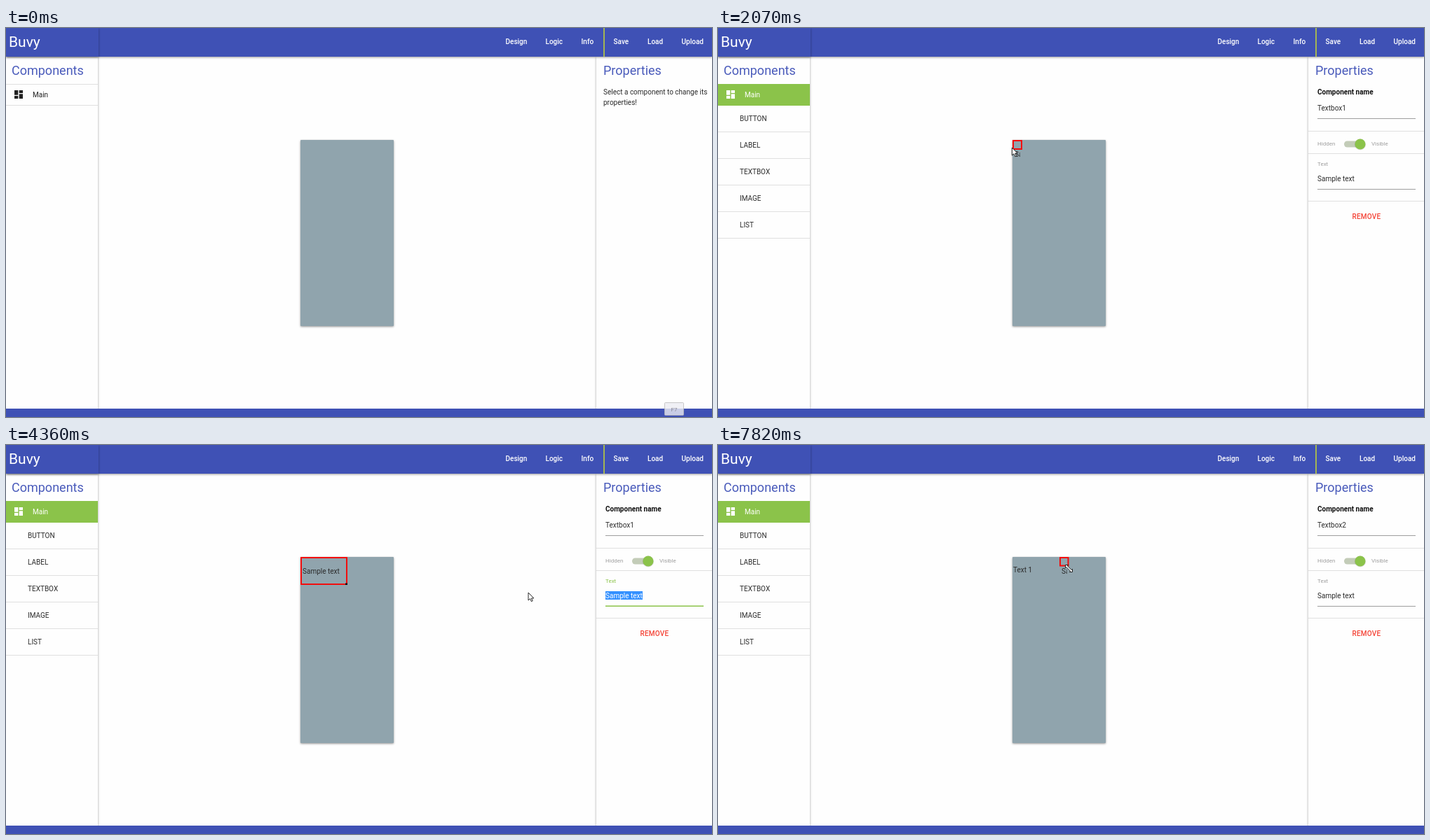
Write an HTML page that moves like this. It is 1007 by 556 pixels and loops after 8 s.

```html
<!DOCTYPE html>
<html lang="en">
<head>
<meta charset="utf-8">
<title>App designer</title>
<style>
html, body { margin: 0; width: 100%; height: 100%; overflow: hidden; background: #fefefe; }
#stage { position: absolute; left: 0; top: 0; width: 1007px; height: 556px; overflow: hidden; }
#stage div { position: absolute; }
#left { left: 0; top: 41px; width: 131px; height: 503px; }
#right { left: 842px; top: 41px; width: 165px; height: 503px; }
#left, #right { background: #fefefe; box-shadow: 0 1px 3px rgba(0,0,0,.38); }
#bar { left: 0; top: 0; width: 1007px; height: 41px; }
#brand { left: 0; top: 0; width: 132px; height: 41px; }
#foot { left: 0; top: 544px; width: 1007px; height: 12px; }
#bar, #brand, #foot { background: #3f51b5; }
#bar, #brand { box-shadow: 0 1px 3px rgba(0,0,0,.4); }
#phone { left: 420px; top: 160px; width: 133px; height: 266px; border-radius: 1px;
  background: #90a4ad; box-shadow: 0 1px 3px rgba(0,0,0,.42); }
svg { position: absolute; left: 0; top: 0; }
text { font: 10px Roboto, sans-serif; fill: #2b2b2b; white-space: pre; }
.title { font-size: 18px; fill: #4a5bbb; }
.nav { font-weight: 500; fill: #fff; }
.small { font-size: 8px; fill: #9e9e9e; }
.rule { fill: #e0e0e0; }
.frame { fill: none; stroke: #f20d0d; stroke-width: 2; }
.glyph { fill: #fff; stroke: #111; stroke-width: .9; stroke-linejoin: round; }
</style>
</head>
<body>
<div id="stage">
  <div id="left"></div><div id="right"></div><div id="phone"></div>
  <div id="bar"></div><div id="brand"></div><div id="foot"></div>
  <svg width="1007" height="556">
    <defs>
      <clipPath id="menuClip"><rect id="menuArea" y="110" width="131"/></clipPath>
      <clipPath id="selClip"><rect id="selArea" y="209" height="12"/></clipPath>
      <clipPath id="clip1"><rect id="area1" x="420" y="160" height="60"/></clipPath>
      <clipPath id="clip2"><rect x="487" y="160" width="11" height="60"/></clipPath>
    </defs>
    <text x="4" y="27" style="font-size:21px;fill:#fff">Buvy</text>
    <g id="nav"></g>
    <rect x="852" width="2" height="41" fill="#a3b552"/>
    <text class="title" x="8" y="67">Components</text>
    <text class="title" x="852" y="67">Properties</text>

    <rect id="header" y="80" width="131" height="31" fill="#8bc34a"/>
    <g id="headerRules" class="rule"><rect y="80" width="131" height="1"/><rect y="110" width="131" height="1"/></g>
    <g id="main">
      <path d="M12 89h5.3v6.7H12zM12 97h5.3v4H12zM18.7 89H24v4h-5.3zM18.7 94.3H24v6.7h-5.3z"/>
      <text x="38" y="99" style="fill:inherit">Main</text>
    </g>
    <g id="menu" clip-path="url(#menuClip)"></g>

    <g id="hint"><text x="852" y="95">Select a component to change its</text><text x="852" y="110">properties!</text></g>
    <g id="props">
      <text x="855" y="95" font-weight="700" style="font-weight:700;fill:#111">Component name</text>
      <text id="name" x="855" y="118"></text>
      <rect x="855" y="129" width="140" height="1" fill="#9e9e9e"/>
      <g class="rule"><rect x="842" y="147" width="165" height="1"/><rect x="842" y="179" width="165" height="1"/><rect x="842" y="247" width="165" height="1"/></g>
      <text class="small" x="855" y="168">Hidden</text>
      <text class="small" x="932" y="168">Visible</text>
      <rect x="893" y="161.5" width="27" height="9" rx="4.5" fill="#c3ccb8"/>
      <circle cx="916" cy="166.4" r="8" fill="#000" opacity=".15"/>
      <circle cx="916" cy="166" r="7.5" fill="#8bc34a"/>
      <text id="label" class="small" x="855" y="197">Text</text>
      <text id="value" x="855" y="218.500"></text>
      <g clip-path="url(#selClip)">
        <rect x="855" y="209" width="53" height="12" fill="#3390ff"/>
        <text x="855" y="218.500" style="fill:#fff">Sample text</text>
      </g>
      <rect id="caret" y="209" width="1" height="12" fill="#222"/>
      <rect id="underline" x="855" width="140"/>
      <text x="904.500" y="273" style="font-weight:500;fill:#f44336;letter-spacing:.2px">REMOVE</text>
    </g>

    <rect id="glow" x="420" y="160" fill="#fff" opacity=".25"/>
    <g id="box1">
      <g clip-path="url(#clip1)"><text id="text1"></text></g>
      <rect id="frame1" class="frame" x="421" y="161"/>
      <rect id="grip" x="484" y="197.500" width="3" height="2.500" fill="#111"/>
    </g>
    <g id="box2">
      <g clip-path="url(#clip2)"><text x="490" y="184">Sample text</text></g>
      <rect class="frame" x="488" y="161" width="11.500" height="11.500"/>
    </g>

    <g id="key">
      <rect x="939.500" y="535.500" width="27" height="18" rx="1" fill="#ececf2" fill-opacity=".8" stroke="#bbb" stroke-opacity=".8"/>
      <text x="948.500" y="548" style="font-size:8px;fill:#8b8b96">F7</text>
    </g>

    <g id="cursor" class="glyph">
      <path id="arrow" d="M0 0V11L2.600 8.700 4.300 12.600 6.100 11.800 4.500 8H7.800Z"/>
      <path id="hand" d="M-1.200 8V1.200C-1.200 -.3 1.200 -.3 1.200 1.200V5.200C1.600 4.400 3.200 4.600 3.300 5.600 3.900 4.900 5.200 5.200 5.300 6.200 6.200 5.700 7.200 6.300 7.200 7.400V10.500L5.800 14.600H-.2L-3.700 9.600C-4.600 8 -2.900 7 -2 8L-1.200 9Z"/>
      <path id="resize" d="M-5 -5H-.8L-2.100 -3.700 3.700 2.100 5 .8V5H.8L2.100 3.700 -3.700 -2.100 -5 -.8Z"/>
      <path id="ibeam" d="M-2.500 -5.500H2.500M-2.500 5.500H2.500M0 -5.500V5.500" style="stroke:#333"/>
    </g>
  </svg>
</div>
<script>
const LOOP = 8000, OPEN = 470, ADD_FIRST = 1130, PRESS = 4020, RELEASE = 4345, ADD_SECOND = 7090;
const $ = id => document.getElementById(id);
const set = (id, attrs) => { for (const k in attrs) $(id).setAttribute(k, attrs[k]); };
const show = (id, on) => { $(id).style.display = on ? '' : 'none'; };
const clamp = (v, lo = 0, hi = 1) => Math.min(hi, Math.max(lo, v));
const linear = p => p;
const sine = p => (1 - Math.cos(Math.PI * p)) / 2;

// Keys are [time, x, y]; values hold before the first and after the last key.
function track(keys, t, ease) {
  let i = keys.findIndex(k => k[0] > t);
  if (i === 0) return keys[0].slice(1);
  if (i < 0) return keys[keys.length - 1].slice(1);
  const [a, b] = [keys[i - 1], keys[i]];
  const p = ease((t - a[0]) / (b[0] - a[0]));
  return [a[1] + (b[1] - a[1]) * p, a[2] + (b[2] - a[2]) * p];
}

const SIZE = [[2380, 14, 14], [2850, 58, 30], [3060, 67, 40]];
const boxSize = t => track(SIZE, t, linear);

const POINTER = [
  [20, 150, 130], [400, 60, 97], [500, 60, 97], [800, 62, 211], [890, 62, 211],
  [1020, 75, 208], [1180, 75, 208], [1630, 383, 175], [1750, 383, 175], [2210, 429, 170],
  [2380, 430, 172], [3060, 485, 198], [3370, 485, 198], [3520, 480, 190], [3660, 480, 190],
  [PRESS, 908, 215], [4330, 791, 216], [4360, 745, 211], [6570, 745, 211], [6600, 738, 207],
  [7030, 75, 209], [7200, 75, 209], [7820, 500.5, 176.5]
];
function pointer(t) {
  if (t > 2380 && t < 3060) return boxSize(t).map((v, i) => v + (i ? 158 : 418));
  return track(POINTER, t, sine);
}

const TYPING = [[5210, 1], [5530, 2], [5740, 3], [5840, 4], [6110, 5], [6190, 6]];
function typed(t) {
  const count = TYPING.filter(([at]) => t >= at).length;
  return count ? 'Text 1'.slice(0, count) : 'Sample text';
}

function cursorKind(t, x) {
  if (x < 131) return 'hand';
  if ((t >= 2190 && t < 3440) || t >= 7770) return 'resize';
  if (x > 850 || (t >= PRESS && t < RELEASE)) return 'ibeam';
  return 'arrow';
}

$('nav').innerHTML = [['Design', 712.5], ['Logic', 769.5], ['Info', 820.5], ['Save', 866.5], ['Load', 915], ['Upload', 963.5]]
  .map(([s, x]) => `<text class="nav" x="${x}" y="23">${s}</text>`).join('');
$('menu').innerHTML = ['BUTTON', 'LABEL', 'TEXTBOX', 'IMAGE', 'LIST']
  .map((s, i) => `<text x="31" y="${133 + 38 * i}">${s}</text><rect class="rule" y="${148 + 38 * i}" width="131" height="1"/>`).join('');

function render(t) {
  const open = t >= OPEN, first = t >= ADD_FIRST, second = t >= ADD_SECOND;
  const focused = t >= PRESS && !second;
  const [x, y] = pointer(t);

  $('key').style.opacity = 1 - clamp((t - 20) / 280);
  show('header', open);
  show('headerRules', !open);
  $('main').style.fill = open ? '#fff' : '#212121';
  set('menuArea', { height: open ? 192 * (1 - (1 - clamp((t - OPEN) / 350)) ** 4) : 0 });

  show('hint', !first);
  show('props', first);
  $('name').textContent = second ? 'Textbox2' : 'Textbox1';
  $('value').textContent = second ? 'Sample text' : typed(t);
  $('label').style.fill = focused ? '#8bc34a' : '';
  set('underline', { y: focused ? 229.5 : 230, height: focused ? 1.5 : 1, fill: focused ? '#8bc34a' : '#9e9e9e' });
  const selecting = t >= PRESS && t < TYPING[0][0];
  const from = clamp(x, 855, 908);
  set('selArea', { x: from, width: selecting ? 908 - from : 0 });
  const typing = focused && t >= TYPING[0][0];
  show('caret', typing);
  if (typing) set('caret', { x: 855 + $('value').getComputedTextLength() });

  const [w, h] = boxSize(t), [gw, gh] = boxSize(t + 180);
  show('box1', first);
  set('frame1', { width: w - 2, height: h - 2 });
  set('area1', { width: w - 3 });
  set('text1', second ? { x: 421, y: 182 } : { x: 423, y: 184 });
  $('text1').textContent = typed(t);
  show('frame1', !second);
  show('grip', t >= 3060 && !second);
  show('glow', t >= 2380 && t < 3060);
  set('glow', { width: gw - 1, height: gh });
  show('box2', second);

  show('cursor', t >= 20);
  set('cursor', { transform: `translate(${x} ${y})` });
  const kind = cursorKind(t, x);
  for (const id of ['arrow', 'hand', 'resize', 'ibeam']) show(id, id === kind);
}

function tick() {
  render(performance.now() % LOOP);
  requestAnimationFrame(tick);
}
tick();
</script>
</body>
</html>
```
